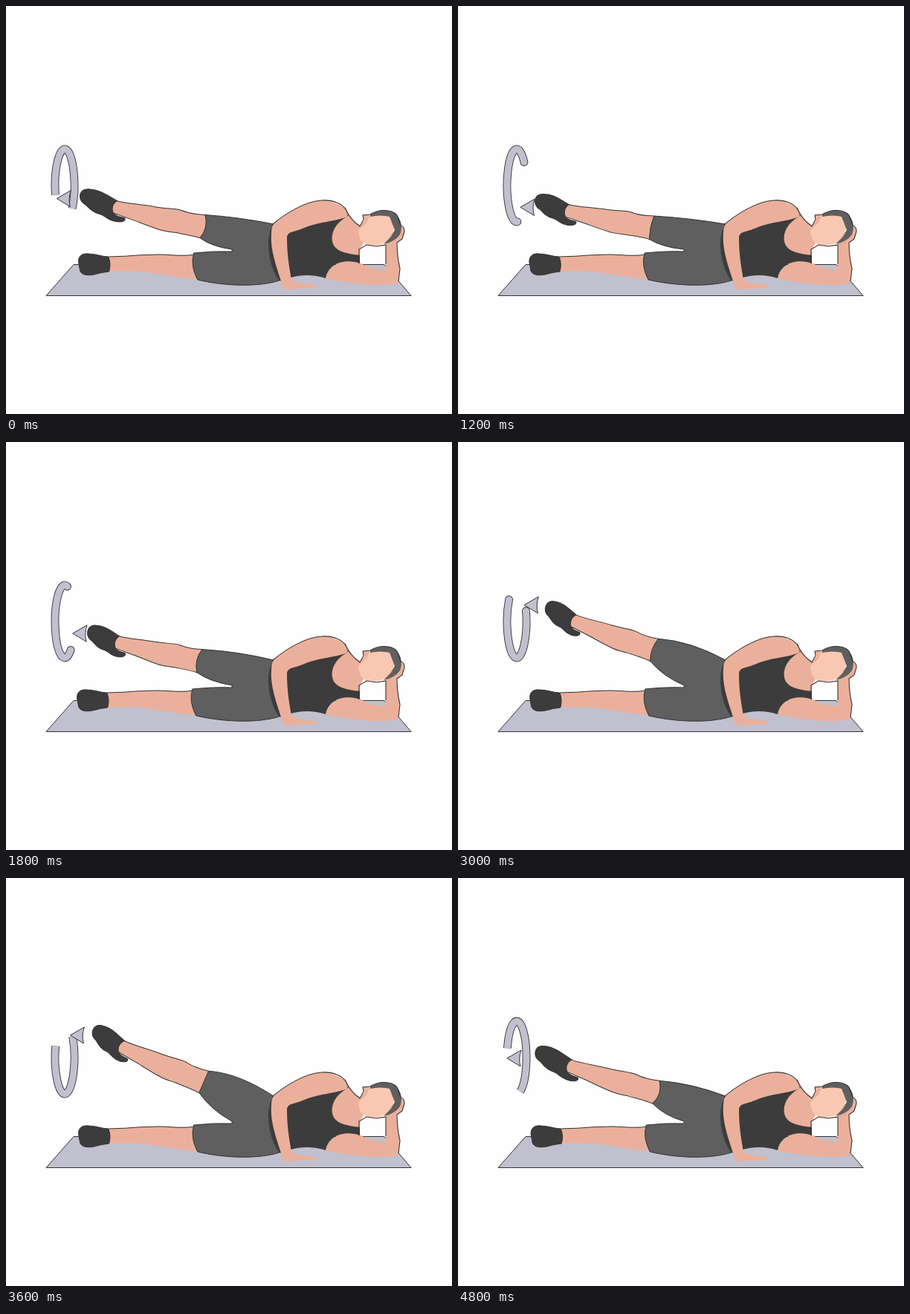
An HTML page that plays this animation: 600 by 550 pixels, repeating every 5400 ms.

```html
<!DOCTYPE html>
<html lang="en">
<head>
<meta charset="utf-8">
<title>Side-lying leg circles</title>
<style>
  html, body { margin: 0; width: 100%; height: 100%; overflow: hidden; background: #fefefe; }
  svg { display: block; width: 100%; height: 100%; }
  .skin { fill: #ebb09b; }
  .face { fill: #fac8b2; }
  .shoe, .shirt { fill: #3c3c3c; }
  .shorts, .hair { fill: #5f5f5f; }
  .mat, .head { fill: #c1c0ce; }
  .edge { stroke: #333; stroke-width: 1; stroke-linejoin: round; }
  .line { fill: none; stroke: #333; stroke-width: 1.1; }
  .rim { fill: none; stroke: #333; stroke-width: 10.8; }
  .band { fill: none; stroke: #c1c0ce; stroke-width: 9; }
</style>
</head>
<body>
<svg viewBox="0 0 600 550">
  <path class="mat edge" d="M91 348.5H509L545 390.5H54Z"/>

  <g id="arrow">
    <path class="rim"/>
    <path class="band"/>
    <path class="head edge" d="M-11 0L8 -11Q4 0 7 11Z"/>
  </g>

  <g id="restLeg">
    <path class="skin" d="M136 338C160 338 180 335 205 335C222 335 238 338 256 335V368C235 367 215 362 190 359C170 356 155 358 136 357Z"/>
    <path class="line" d="M137 338C160 338 180 335 205 335C222 335 238 338 252 335"/>
    <path class="shoe edge" d="M97 346C96 338 101 333 110 334C120 334 129 338 137 338Q141 347 138 358Q128 359 118 362C107 364 101 362 99 357Z"/>
  </g>

  <g id="raisedLeg">
    <path class="shoe edge" d="M-48 -4C-49 -11 -45 -15 -37 -16C-25 -18 -16 -14 1 -8.5L-1 8.5C5 13 9 11 15 12Q17 15 13 17C7 20 3 19 -1 18.7C-8 18 -12 14 -18 14C-26 14 -32 10 -38 6Q-47 3 -48 -4Z"/>
    <path class="skin edge" d="M0 -8.5C18 -8 30 -11 53 -12C70 -13 78 -16 87 -15C98 -13 108 -14 119 -16L126 0L119 16C105 15 95 16 85 16C75 17 68 18 59 16.4C45 15 35 13 27 12L-1 8.5Q-7 0 0 -8.5Z"/>
  </g>

  <path id="shorts" class="shorts edge"/>

  <!-- Torso, supporting arm and head -->
  <path class="shirt" d="M360 294Q350 310 355 338Q360 361 368 370L374 372L366 295Z"/>
  <path class="skin" d="M445 266L457 273L467 290L477 296L482 318L476 328V338H440L434 300Z"/>
  <path class="skin" d="M430 368Q434 349 455 344Q468 342 478 347Q488 355 511 356V322L508 316L529 297Q536 297 536 304L533 314L526 319Q526 337 530 354L527 374Q505 378 470 374Z"/>
  <path class="shirt" d="M376 296L450 274L461 283C444 291 437 305 439 317C441 331 459 334 476 336V347C463 342 447 344 438 352Q431 359 430 367Q405 359 380 367Z"/>
  <path class="face" d="M491 281L517 283L523 300L512 318Q499 325 485 322Q475 317 474 304Q475 294 482 290Z"/>
  <path class="skin" d="M474 302Q476 294 482 289L480 282L490 281L485 292Z"/>
  <path class="hair" d="M490 281C500 274 519 273 526 282C533 290 533 300 530 308Q523 318 508 321L518 311L523 302L516 284Q504 281 490 284Z"/>
  <path class="line" d="M456 272Q462 287 476 297L481 288L480 282L490 281C500 274 519 273 526 282L531 296Q536 297 536 304L533 314L526 319Q526 337 530 354L528 371M511 348V322L498 324L485 322L475 328V347"/>

  <!-- Front arm -->
  <path class="skin" d="M360 294C374 281 402 263 425 262C441 261 454 270 460 284C441 291 418 291 399 300C386 305 378 304 378 313C378 335 381 352 384 369C392 375 403 374 415 376Q421 379 413 380L377 382Q372 380 371 374C364 351 355 329 357 306Q357 298 360 294Z"/>
  <path class="line" d="M358 295C374 281 402 263 425 262C441 261 452 267 457 274"/>
</svg>
<script>
const STEP = 600;
const POSES = 9;
const SHIN = 119;

// The gap in the arrow ring drifts over the top, then drops quickly: [step, degrees]
const gapKeys = [[0, 102], [2, 23], [5, -80], [7, -117], [8, -228], [9, -258]];

const cos = degrees => Math.cos(degrees * Math.PI / 180);
const sin = degrees => Math.sin(degrees * Math.PI / 180);
const set = (selector, name, value) =>
  document.querySelector(selector).setAttribute(name, value);
const onEllipse = (x, y, rx, ry, angle) => [x + rx * cos(angle), y + ry * sin(angle)];

function interpolate(keys, at) {
  const next = keys.findIndex(key => key[0] > at);
  const [t0, v0] = keys[next - 1], [t1, v1] = keys[next];
  return v0 + (v1 - v0) * (at - t0) / (t1 - t0);
}

function drawLeg(phase) {
  // The foot circles, rising slower than it falls; the shin tilts with its height
  const ax = 151 + 5 * cos(phase - 220);
  const ay = 252 + 25.5 * cos(phase - 64 + 22 * cos(phase));
  const tilt = 16 + (257 - ay) * .245;
  const kneeX = 263.7 + 3.5 * cos(phase + 75);
  const scale = (kneeX - ax) / cos(tilt) / SHIN;
  const shift = 1.3 * cos(phase - 300);
  const place = (x, y) => [
    ax + x * scale * cos(tilt) - y * sin(tilt),
    ay + x * scale * sin(tilt) + y * cos(tilt)
  ];
  const top = place(SHIN, -16), low = place(SHIN, 16);
  const hem = place(SHIN + 9 * cos(phase + 30), 0);

  set('#raisedLeg', 'transform', `translate(${ax} ${ay}) rotate(${tilt})`);
  set('#raisedLeg .skin', 'transform', `scale(${scale} 1)`);
  set('#raisedLeg .shoe', 'transform', `scale(${.95 + .09 * cos(phase + 15)} 1)`);
  set('#restLeg', 'transform', `translate(${shift} 0)`);
  set('#shorts', 'd', `M${top}Q313 ${top[1] + 3} 360 294Q350 310 355 338Q360 361 368 370
    C340 379 295 378 ${257 + shift} 369Q${247 + shift} 350 ${252 + shift} 333Q280 330 304 331V328
    Q${(low[0] + 304) / 2 - 6} ${(low[1] + 328) / 2 + 4} ${low}Q${hem} ${top}Z`);
}

function drawArrow(gap) {
  const ring = angle => onEllipse(79, 242, 13, 49, angle);
  const arc = `M${ring(gap + 63)}A13 49 0 1 1 ${ring(gap - 63)}`;
  for (const part of ['.rim', '.band']) set('#arrow ' + part, 'd', arc);
  set('#arrow', 'stroke-linecap', cos(gap) > 0 ? 'round' : 'butt');
  set('#arrow .head', 'transform', `translate(${onEllipse(90, 240, 13, 34, gap + 43)})`);
}

let shown = -1;
function frame() {
  const index = Math.floor(performance.now() / STEP) % POSES;
  if (index !== shown) {
    drawLeg(index * 360 / POSES);
    drawArrow(interpolate(gapKeys, index));
    shown = index;
  }
  requestAnimationFrame(frame);
}
frame();
</script>
</body>
</html>
```
